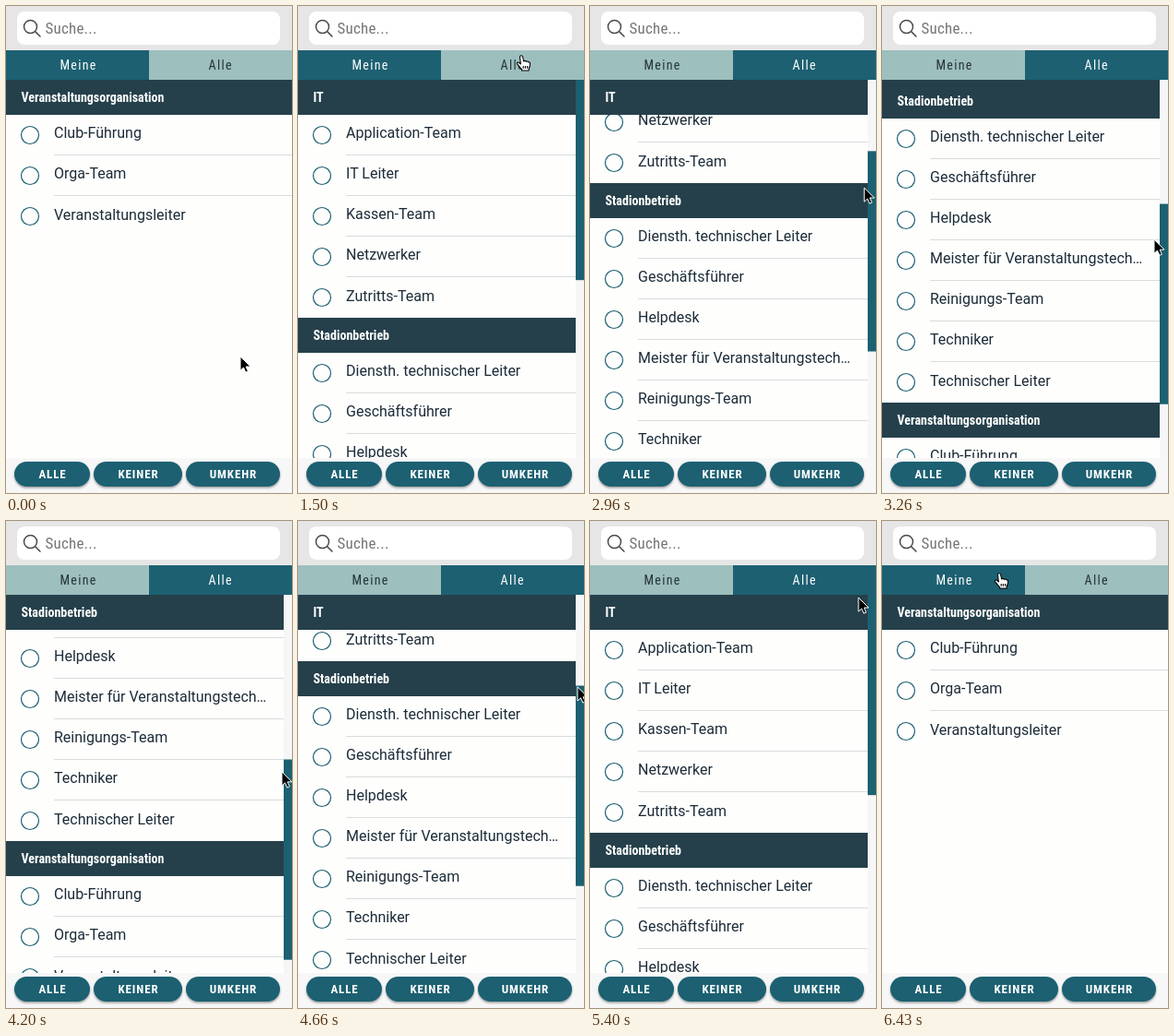
Animation of 310x528 px, one loop 7.66 s. Source, as an HTML page:

```html
<!DOCTYPE html>
<html lang="de">
<head>
<meta charset="utf-8">
<title>Gruppenauswahl</title>
<style>
html, body { margin: 0; width: 100%; height: 100%; overflow: hidden; background: #f7f7f8; }
svg { display: block; }
text { font-family: Roboto, sans-serif; font-size: 16px; fill: #1c2c38; }
.cond { font-family: "Roboto Condensed", Roboto, sans-serif; font-stretch: 75%; }
.head { font-size: 14px; font-weight: 700; fill: #fff; }
.tab { font-size: 14px; text-anchor: middle; }
.btn { font-size: 13px; font-weight: 700; fill: #fff; text-anchor: middle; }
.hint { font-size: 17px; fill: #757575; }
</style>
</head>
<body>
<svg id="stage" width="310" height="528" viewBox="0 0 310 528">
  <defs>
    <clipPath id="view"><rect y="80" width="310" height="410"/></clipPath>
    <filter id="shade" x="-10%" y="-20%" width="120%" height="160%">
      <feDropShadow dx="0" dy="1.5" stdDeviation="1.2" flood-color="#000" flood-opacity=".4"/>
    </filter>
  </defs>
</svg>
<script>
const LOOP = 7660, TOP = 80, VIEW = 410, HEAD = 38, ROW = 44;
const TEAL = '#1c6071', DARK = '#25404b';
const stage = document.getElementById('stage');

const EVENTS = ['Veranstaltungsorganisation', ['Club-Führung', 'Orga-Team', 'Veranstaltungsleiter']];
const ALL = [
  ['IT', ['Application-Team', 'IT Leiter', 'Kassen-Team', 'Netzwerker', 'Zutritts-Team']],
  ['Stadionbetrieb', ['Diensth. technischer Leiter', 'Geschäftsführer', 'Helpdesk',
    'Meister für Veranstaltungstech…', 'Reinigungs-Team', 'Techniker', 'Technischer Leiter']],
  EVENTS
];

function add(parent, tag, attrs, text) {
  const el = document.createElementNS('http://www.w3.org/2000/svg', tag);
  for (const k in attrs) el.setAttribute(k, attrs[k]);
  if (text) el.textContent = text;
  parent.appendChild(el);
  return el;
}
const box = (parent, x, y, width, height, fill, rx = 0) =>
  add(parent, 'rect', { x, y, width, height, fill, rx });

// Emulates the condensed face when the font has no width axis.
const probe = add(stage, 'text', { class: 'cond head' }, EVENTS[0]);
const squeeze = probe.getComputedTextLength() > 166 ? 0.885 : 1;
probe.remove();

const cond = (parent, x, y, cls, text, spacing = 0) => add(parent, 'text', {
  class: 'cond ' + cls,
  transform: `translate(${x} ${y}) scale(${squeeze} 1)`,
  'letter-spacing': spacing / squeeze
}, text);

function makeList(sections, width) {
  const root = add(stage, 'g', { 'clip-path': 'url(#view)' });
  box(root, 0, TOP, 310, VIEW, '#fefefd');
  const rows = add(root, 'g', {});
  const heads = [];
  let y = TOP;
  for (const [title, names] of sections) {
    const top = y;
    y += HEAD;
    names.forEach((name, i) => {
      const last = i === names.length - 1;
      add(rows, 'circle', { cx: 26, cy: y + 22, r: 9.5, fill: 'none', stroke: TEAL, 'stroke-width': 1.2 });
      add(rows, 'text', { x: 52, y: y + (last ? 26 : 25) }, name);
      if (!last) box(rows, 52, y + ROW - 1, width - 52, 1, '#d9dcdc');
      y += ROW;
    });
    const el = add(root, 'g', {});
    box(el, 0, 0, width, HEAD, DARK);
    cond(el, 16.5, 24, 'head', title);
    heads.push({ el, top, bottom: y });
  }
  const total = y - TOP;
  let thumb = null;
  if (total > VIEW) {
    box(root, width, TOP, 9, VIEW, '#f6f6f7');
    thumb = box(root, width, TOP, 9, VIEW * VIEW / total, TEAL);
  }
  return {
    show(on) { root.setAttribute('display', on ? 'inline' : 'none'); },
    scroll(s) {
      rows.setAttribute('transform', `translate(0 ${-s})`);
      for (const h of heads) {
        const pos = Math.min(Math.max(TOP, h.top - s), h.bottom - s - HEAD);
        h.el.setAttribute('transform', `translate(0 ${pos})`);
      }
      if (thumb) thumb.setAttribute('y', TOP + s * VIEW / total);
    }
  };
}

// Search field
box(stage, 0, 0, 310, 48, '#e6e6e6');
box(stage, 12, 6, 285, 36, '#fff', 8);
add(stage, 'path', {
  d: 'M33.5 22.5a7 7 0 1 1-14 0a7 7 0 1 1 14 0M31.6 27.6L37 33',
  fill: 'none', stroke: '#4a4a4a', 'stroke-width': 1.5, 'stroke-linecap': 'round'
});
cond(stage, 42.5, 30, 'hint', 'Suche...', 0.2);

// Tabs
const makeTab = (x, w, label, tx) => ({
  bg: box(stage, x, 48, w, 32, TEAL),
  label: cond(stage, tx, 69, 'tab', label, 1.3)
});
const tabMine = makeTab(0, 155, 'Meine', 78.5);
const tabAll = makeTab(155, 155, 'Alle', 232.7);

const listMine = makeList([EVENTS], 310);
const listAll = makeList(ALL, 301);
listMine.scroll(0);

// Footer buttons
box(stage, 0, 490, 310, 38, '#f7f7f8');
for (const [x, w, label] of [[9, 82, 'ALLE'], [95, 96, 'KEINER'], [195, 102, 'UMKEHR']]) {
  box(stage, x, 494, w, 27, TEAL, 13.5).setAttribute('filter', 'url(#shade)');
  cond(stage, x + w / 2 + 0.5, 512, 'btn', label, 0.9);
}

// Pointer
const pointer = add(stage, 'g', {});
const arrow = add(pointer, 'path', {
  d: 'M0 0V15.2L3.5 12L5.8 17.2L8.4 16.1L6.1 11H11Z',
  fill: '#000', stroke: '#fff', 'stroke-width': 1
});
const hand = add(pointer, 'path', {
  d: 'M-1.5 1.2C-1.5-.6 1.3-.6 1.6 1L2.6 6C3.6 5 5 5.2 5.3 6.4C6.3 5.6 7.6 6 7.8 7' +
     'C8.9 6.6 9.6 7.2 9.6 8.4C9.6 11 9 12.5 8.2 14V16H.6V14.6C-.8 13-2.6 11-4.4 8.8' +
     'C-5 7.6-3.6 6.4-2.4 7.4L-.6 9ZM2.2 11V13.8M4.4 11V13.8M6.6 11V13.8',
  fill: '#fff', stroke: '#000', 'stroke-width': 1.1, 'stroke-linejoin': 'round'
});

// Smooth monotone curve through [time, value] points
function curve(keys) {
  const n = keys.length;
  const slope = i => (keys[i + 1][1] - keys[i][1]) / (keys[i + 1][0] - keys[i][0]);
  const tan = keys.map((_, i) => {
    if (i === 0 || i === n - 1) return 0;
    const a = slope(i - 1), b = slope(i);
    return a * b > 0 ? 2 * a * b / (a + b) : 0;
  });
  return t => {
    if (t <= keys[0][0]) return keys[0][1];
    if (t >= keys[n - 1][0]) return keys[n - 1][1];
    let i = 0;
    while (t >= keys[i + 1][0]) i++;
    const [t0, a] = keys[i], [t1, b] = keys[i + 1];
    const d = t1 - t0, u = (t - t0) / d, v = 1 - u;
    return a * v * v * (1 + 2 * u) + b * u * u * (3 - 2 * u)
      + d * u * v * (tan[i] * v - tan[i + 1] * u);
  };
}

const path = [
  [100, 254, 380], [860, 244, 75], [900, 244, 75], [930, 242, 54], [1600, 242, 54],
  [2100, 302, 102], [2460, 302, 102], [2630, 301, 130], [3260, 295, 253], [3600, 296, 295],
  [4030, 296, 295], [4200, 299, 272], [4660, 303, 180], [5230, 291, 83], [5400, 291, 83],
  [5800, 127, 57]
];
const px = curve(path.map(([t, x]) => [t, x]));
const py = curve(path.map(([t, , y]) => [t, y]));
const scrollAt = curve([
  [2460, 0], [2630, 37], [3260, 254], [3600, 364],
  [4030, 364], [4200, 337], [4660, 186], [5210, 0]
]);

const ramp = (t, a, b) => Math.min(1, Math.max(0, (t - a) / (b - a)));
const mix = (a, b, p) => `rgb(${a.map((v, i) => Math.round(v + (b[i] - v) * p))})`;

function paintTab(tab, active) {
  tab.bg.setAttribute('fill', mix([157, 191, 190], [28, 96, 113], active));
  tab.label.style.fill = mix([38, 52, 58], [255, 255, 255], active);
}

function draw(t) {
  const p = ramp(t, 1500, 1700) - ramp(t, 6230, 6430);
  paintTab(tabMine, 1 - p);
  paintTab(tabAll, p);

  const all = t >= 1500 && t < 6230;
  listMine.show(!all);
  listAll.show(all);
  if (all) listAll.scroll(Math.round(scrollAt(t)));

  const x = px(t), y = py(t), link = y < 74.5 || (t > 5400 && y < 80);
  pointer.setAttribute('transform', `translate(${x.toFixed(2)} ${y.toFixed(2)})`);
  arrow.setAttribute('display', link ? 'none' : 'inline');
  hand.setAttribute('display', link ? 'inline' : 'none');
}

const start = performance.now();
function tick() {
  draw((performance.now() - start) % LOOP);
  requestAnimationFrame(tick);
}
tick();
</script>
</body>
</html>
```
